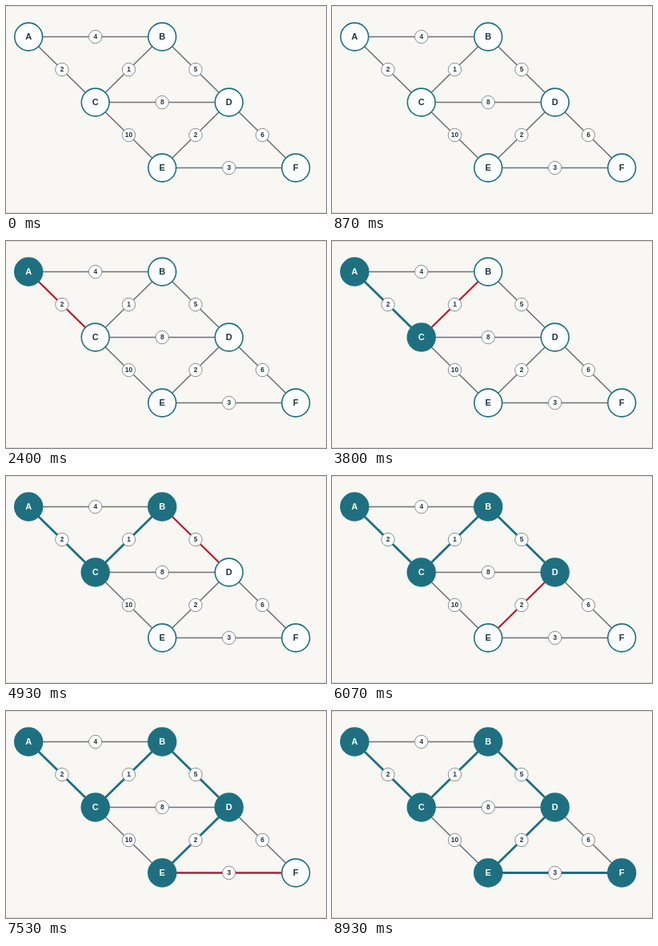
Write an HTML page with a canvas that moves like this. It is 400x259 px and loops after 9 s.

```html
<!DOCTYPE html>
<html lang="en">
<head>
<meta charset="utf-8">
<title>Minimum spanning tree</title>
<style>
html, body { margin: 0; width: 100%; height: 100%; overflow: hidden; background: #f8f7f3; }
canvas { display: block; }
</style>
</head>
<body>
<canvas id="stage" width="400" height="259"></canvas>
<script>
const ctx = document.getElementById('stage').getContext('2d');
const LOOP = 9000;
const FIRST_RED = 2100, STEP = 1200;
const RED_HOLD = 600, NODE_DELAY = 800;
const EDGE_FADE = 250, NODE_FADE = 350;

const GREY = [107, 114, 120], RED = [190, 25, 45], TEAL = [30, 112, 128];
const WHITE = [255, 255, 255], INK = [28, 55, 68];

// name: [x, y, time at which the node joins the tree]
const joinTime = k => FIRST_RED + k * STEP + NODE_DELAY;
const nodes = {
  A: [28.2, 38.5, 900],
  B: [195.2, 38.5, joinTime(1)],
  C: [111.7, 120.5, joinTime(0)],
  D: [278.7, 120.5, joinTime(2)],
  E: [195.2, 202.5, joinTime(3)],
  F: [362.2, 202.5, joinTime(4)]
};

// ends, weight, position in the selection order
const edges = [
  ['AB', 4], ['AC', 2, 0], ['BC', 1, 1], ['BD', 5, 2], ['CD', 8],
  ['CE', 10], ['DE', 2, 3], ['DF', 6], ['EF', 3, 4]
];

const mix = (a, b, p) => a + (b - a) * p;
const blend = (a, b, p) => a.map((v, i) => mix(v, b[i], p));
const css = c => `rgb(${c.map(Math.round).join(',')})`;

function ease(t, start, length) {
  const p = Math.min(1, Math.max(0, (t - start) / length));
  return p * p * (3 - 2 * p);
}

function disc(x, y, r, fill, stroke, width) {
  ctx.beginPath();
  ctx.arc(x, y, r, 0, Math.PI * 2);
  ctx.fillStyle = css(fill);
  ctx.fill();
  ctx.strokeStyle = css(stroke);
  ctx.lineWidth = width;
  ctx.stroke();
}

function label(text, x, y, size, color) {
  ctx.font = `bold ${size}px "Liberation Sans", Arial, sans-serif`;
  ctx.fillStyle = css(color);
  ctx.fillText(text, x, y + size * 0.36);
}

function drawEdge(t, [ends, , order]) {
  const [a, b] = [...ends].map(n => nodes[n]);
  let color = GREY, width = 1.6;
  if (order !== undefined) {
    const start = FIRST_RED + order * STEP;
    const red = ease(t, start, EDGE_FADE);
    const done = ease(t, start + RED_HOLD - 30, EDGE_FADE);
    color = blend(blend(GREY, RED, red), TEAL, done);
    width = mix(mix(width, 2.2, red), 2.8, done);
  }
  ctx.beginPath();
  ctx.moveTo(a[0], a[1]);
  ctx.lineTo(b[0], b[1]);
  ctx.strokeStyle = css(color);
  ctx.lineWidth = width;
  ctx.stroke();
}

function drawWeight([ends, weight]) {
  const [a, b] = [...ends].map(n => nodes[n]);
  const x = (a[0] + b[0]) / 2, y = (a[1] + b[1]) / 2;
  disc(x, y, 8.2, WHITE, GREY, 0.8);
  label(weight, x, y, 8.3, INK);
}

function drawNode(t, name) {
  const [x, y, join] = nodes[name];
  const p = ease(t, join, NODE_FADE);
  disc(x, y, 17.4, blend(WHITE, TEAL, p), TEAL, 1.6);
  label(name, x, y - 0.4, 11, blend(INK, WHITE, p));
}

function draw(t) {
  ctx.fillStyle = '#f8f7f3';
  ctx.fillRect(0, 0, 400, 259);
  ctx.fillStyle = '#dedfdc';
  ctx.fillRect(0, 0, 400, 1);
  ctx.fillRect(0, 258, 400, 1);
  ctx.textAlign = 'center';
  edges.forEach(e => drawEdge(t, e));
  edges.forEach(drawWeight);
  Object.keys(nodes).forEach(n => drawNode(t, n));
}

const origin = performance.now();
function tick() {
  draw((performance.now() - origin) % LOOP);
  requestAnimationFrame(tick);
}
draw(0);
requestAnimationFrame(tick);
</script>
</body>
</html>
```
